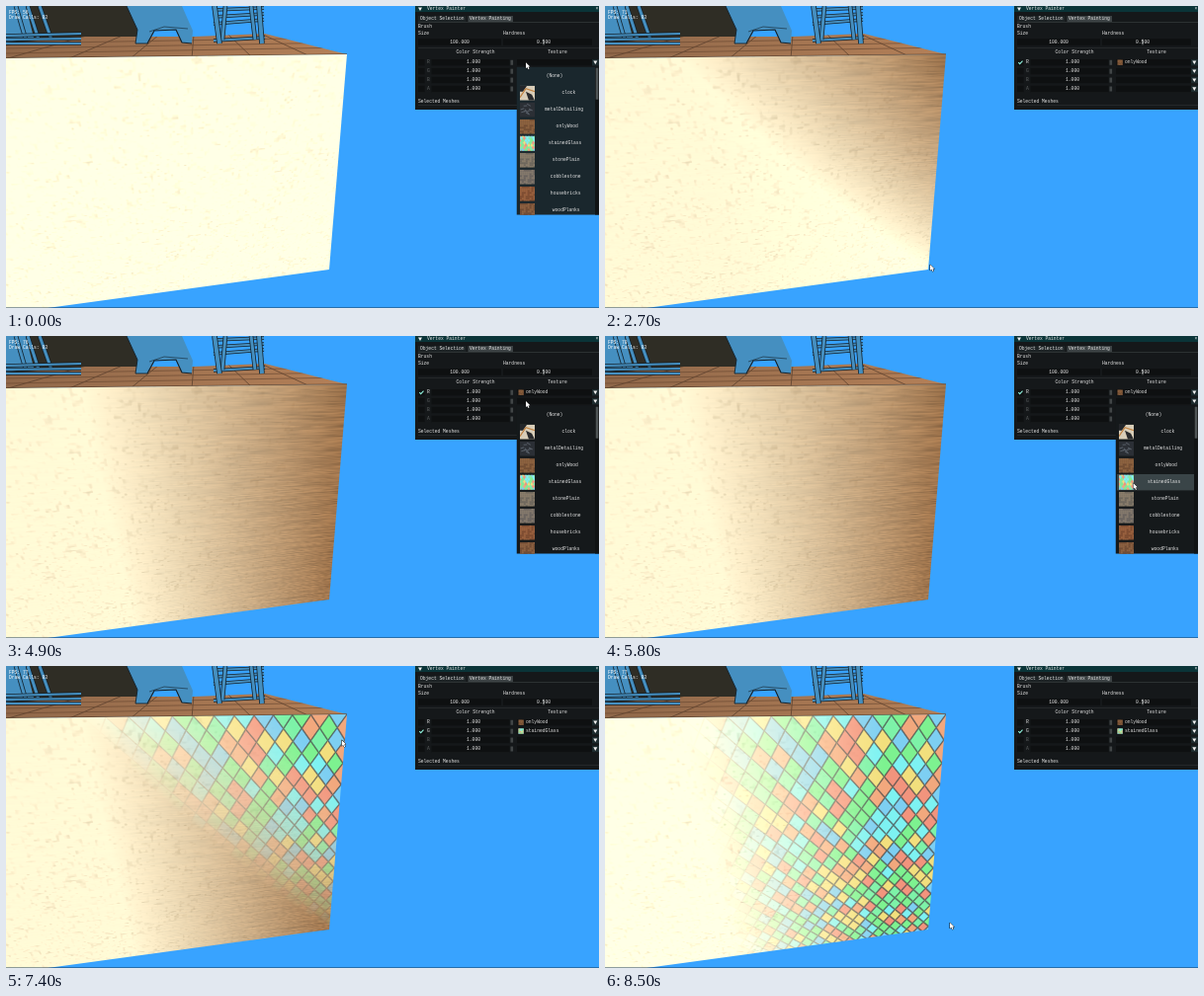
These frames come from a looping animation (600 by 306 pixels, 8600 ms). An HTML page with a canvas:

```html
<!DOCTYPE html>
<html lang="en">
<head>
<meta charset="utf-8">
<title>Vertex Painter</title>
<style>
html, body { margin: 0; width: 100%; height: 100%; overflow: hidden; background: #38a3ff; }
canvas { display: block; width: 600px; height: 306px; }
</style>
</head>
<body>
<canvas id="stage" width="600" height="306"></canvas>
<script>
const LOOP = 8600;
const ctx = document.getElementById('stage').getContext('2d');
const clamp = x => Math.max(0, Math.min(1, x));
const ramp = (t, from, to) => clamp((t - from) / (to - from));
const mix = (a, b, k) => a + (b - a) * k;
const ease = x => x * x * (3 - 2 * x);
const times = (n, draw) => { for (let i = 0; i < n; i++) draw(i); };
const hash = (i, j) => {
  const v = Math.sin(i * 127.1 + j * 311.7) * 43758.5453;
  return v - Math.floor(v);
};
function noise(x, y) {
  const i = Math.floor(x), j = Math.floor(y), fx = ease(x - i), fy = ease(y - j);
  return mix(mix(hash(i, j), hash(i + 1, j), fx), mix(hash(i, j + 1), hash(i + 1, j + 1), fx), fy);
}

function trace(points, g) {
  g.beginPath();
  points.forEach(([x, y]) => g.lineTo(x, y));
}
function poly(points, fill, g = ctx) {
  trace(points, g);
  g.fillStyle = fill;
  g.fill();
}
function line(points, color, width, g = ctx) {
  trace(points, g);
  g.strokeStyle = color;
  g.lineWidth = width;
  g.stroke();
}
function rect(x, y, w, h, fill) {
  ctx.fillStyle = fill;
  ctx.fillRect(x, y, w, h);
}
function text(str, x, y, color = '#e4e4e4', align = 'left') {
  ctx.font = '4.65px "Liberation Mono", monospace';
  ctx.textBaseline = 'middle';
  ctx.textAlign = align;
  ctx.fillStyle = color;
  ctx.fillText(str, x, y);
}

// ---- Script of the demo, in ms ----
const AT = {
  pickWood: 650, checkWood: 880, woodTop: 1550, woodBottom: 2720, openGlass: 4400,
  pickGlass: 6250, uncheckWood: 6500, checkGlass: 6720, glassTop: 7020, glassBottom: 7800
};

// ---- Painted wall: a plane in perspective, shaded per pixel ----
const corner = [345, 49], lowCorner = [327, 267], sideVanish = [2095, 29], downVanish = [300, 594];
const wallOutline = [[0, 53], corner, lowCorner, [42, 306], [0, 306]];
const W = 347, TOP = 47, H = 306 - TOP;
function wallCoords(x, y) {
  const ax = sideVanish[0] - corner[0], ay = sideVanish[1] - corner[1];
  const bx = downVanish[0] - corner[0], by = downVanish[1] - corner[1];
  const det = ax * by - ay * bx, px = x - corner[0], py = y - corner[1];
  const b = (px * by - py * bx) / det, c = (ax * py - ay * px) / det, a = 1 - b - c;
  return [b / a, c / a, a];
}
const leftU = wallCoords(75, 52)[0], bottomV = wallCoords(...lowCorner)[1];

// Pastel pane colour for a lattice cell: hue from a small set, HSL to RGB.
const HUES = [12, 22, 50, 130, 142, 180, 198];
function paneColor(i, j) {
  const hue = HUES[Math.floor(hash(i, j) * HUES.length)], light = 0.72, chroma = 0.23;
  return [0, 8, 4].map(n => {
    const k = (n + hue / 30) % 12;
    return 255 * (light - chroma * Math.max(-1, Math.min(k - 3, 9 - k, 1)));
  });
}
function glassColor(u, v, depth) {
  const a = u / 0.0102, b = v / 0.05, p = a + b, q = a - b;
  const i = Math.floor(p), j = Math.floor(q);
  const edge = Math.min(p - i, 1 - p + i, q - j, 1 - q + j) * 15 * depth ** 1.5;
  const lead = clamp(1.2 - edge) * 0.75;
  return paneColor(i, j).map(c => mix(c, 72, lead));
}
const texels = [];
times(H, y => times(W, x => {
  const [u, v, depth] = wallCoords(x + 0.5, y + TOP + 0.5);
  const speck = Math.max(0, noise(u * 500 + v * 30, v * 170) - 0.6) * noise(u * 120, v * 60);
  const grain = noise(u * 60, v * 320) + noise(u * 130, v * 520) - 1;
  texels.push({
    s: clamp(u / leftU / (1 + 0.25 * v / bottomV)), t: clamp(v / bottomV),
    base: [275, 266, 230].map(c => c - speck * 90),
    wood: [158, 115, 75].map(c => c * (1 + grain * 0.17)),
    glass: glassColor(u, v, depth)
  });
}));
const wall = document.createElement('canvas');
wall.width = W;
wall.height = H;
const wallCtx = wall.getContext('2d');
const pixels = wallCtx.createImageData(W, H);
let shaded = '';

// Linear blend of the vertex weights over the two triangles of the quad.
const vertexBlend = (s, t, top, bottom, left) => s + t < 1
  ? top * (1 - s - t) + bottom * t + left * s
  : bottom * (1 - s) + left * s;

function shadeWall(t) {
  const glassTop = ramp(t, AT.glassTop, AT.glassTop + 330);
  const glassBottom = ramp(t, AT.glassBottom, AT.glassBottom + 400);
  const woodTop = ramp(t, AT.woodTop, AT.woodTop + 600) * (1 - glassTop);
  const woodBottom = ramp(t, AT.woodBottom, AT.woodBottom + 580) * (1 - glassBottom);
  const woodLeft = 0.1 * ramp(t, AT.woodTop, AT.woodTop + 600) * (1 - glassBottom);
  const key = [glassTop, glassBottom, woodTop, woodBottom, woodLeft].join();
  if (key === shaded) return;
  shaded = key;
  texels.forEach((p, n) => {
    const wood = vertexBlend(p.s, p.t, woodTop, woodBottom, woodLeft);
    const glass = clamp(1.35 * vertexBlend(p.s, p.t, glassTop, glassBottom, 0));
    times(3, k => {
      pixels.data[n * 4 + k] = mix(mix(p.base[k], p.wood[k], wood), p.glass[k], glass);
    });
    pixels.data[n * 4 + 3] = 255;
  });
  wallCtx.putImageData(pixels, 0, 0);
}
function drawWall(t) {
  shadeWall(t);
  ctx.save();
  trace(wallOutline, ctx);
  ctx.clip();
  ctx.drawImage(wall, 0, TOP);
  ctx.restore();
}

// ---- Room behind the wall ----
function drawRoom() {
  const blue = '#458fc0', dark = '#14222c';
  const beam = (x1, y1, x2, y2, width) => {
    line([[x1, y1], [x2, y2]], dark, width + 1.6);
    line([[x1, y1], [x2, y2]], blue, width);
  };
  poly([[0, 0], [134, 0], [133, 32], [0, 39]], '#2f2d25');
  const floor = [[0, 38], [75, 31], [190, 31], [262, 28], corner, [0, 53]];
  const shade = ctx.createLinearGradient(0, 0, 345, 0);
  shade.addColorStop(0, '#8f6749');
  shade.addColorStop(1, '#b48058');
  poly(floor, shade);
  ctx.save();
  ctx.clip();
  times(7, i => line([[50 + i * 35, 29], [i * 62 - 60, 53]], '#523a29', 0.7));
  times(3, i => line([[0, 38 + i * 5], [345, 32 + i * 5]], '#6b4a33', 0.7));
  ctx.restore();
  line([[0, 52.6], [345, 48.8]], '#5a4230', 0.8);
  // Folding chair
  poly([[0, 0], [20, 0], [28, 32], [0, 37]], blue);
  times(3, i => beam(10 + i * 12, 0, 20 + i * 13, 34, 3));
  times(3, i => beam(0, 38 - i * 4, 76, 38 - i * 5, 2));
  // Cloth with an arched opening
  poly([[122, 0], [178, 0], [189, 25], [188, 38], [178, 37], [172, 24], [150, 25], [143, 38], [131, 38], [133, 24]], blue);
  line([[143, 38], [150, 25], [172, 24], [178, 37], [188, 38]], dark, 1.2);
  line([[122, 0], [133, 24], [131, 38], [143, 38]], dark, 0.9);
  line([[145, 26], [160, 21], [184, 23]], dark, 0.6);
  // Stool
  times(3, i => beam(210, 4 + i * 7, 261, 2 + i * 6, 2));
  beam(210, 35, 262, 32, 2);
  times(2, i => {
    beam(222 + i * 26, 0, 219 + i * 33, 34, 3);
    beam(211 + i * 45, 0, 216 + i * 43, 38, 4);
  });
}

// ---- Editor panel ----
const ITEMS = [
  ['clock', '#d8cdb8'], ['metalDetailing', '#2b2f35'], ['onlyWood', '#80583a'], ['stainedGlass', '#a9c6a8'],
  ['stonePlain', '#7c7468'], ['cobblestone', '#77706a'], ['housebricks', '#8d5638'], ['woodPlanks', '#7f563b']
];
const WOOD = 2, STAINED = 3;
const FIELD = '#0e1011';
const rowY = row => 57.2 + row * 8.9;
const listTop = row => 61.7 + row * 9;
const itemY = (row, item) => listTop(row) + 26.3 + item * 17;

function icon(item, x, y, size) {
  ctx.save();
  ctx.translate(x, y);
  ctx.scale(size / 5, size / 5);
  ctx.beginPath();
  ctx.rect(0, 0, 5, 5);
  ctx.clip();
  rect(0, 0, 5, 5, ITEMS[item][1]);
  if (item === 0) {
    poly([[0, 0], [2.4, 0], [1, 2], [0, 2]], '#23262a');
    poly([[2, 2], [4, 3], [5, 5], [3, 5]], '#292a2c');
    line([[0, 4], [2, 1], [5, 2]], '#c18444', 0.4);
  } else if (item === 1) {
    times(9, i => {
      const a = hash(i, 3) * 4, b = hash(i, 8) * 4;
      line([[a, b], [a + 1.2, b + hash(i, 5) * 2 - 0.5]], '#565d66', 0.35);
    });
  } else if (item === STAINED) {
    times(8, j => times(6, i => {
      const cx = i + (j % 2) / 2, cy = j * 0.8 - 0.8;
      poly([[cx, cy], [cx + 0.45, cy + 0.75], [cx, cy + 1.5], [cx - 0.45, cy + 0.75]], `rgb(${paneColor(i, j)})`);
    }));
  } else {
    times(8, j => times(8, i => {
      rect(i * 0.65, j * 0.65, 0.6, 0.55, hash(i + item, j) > 0.5 ? 'rgba(255,190,130,.1)' : 'rgba(0,0,0,.12)');
    }));
  }
  ctx.restore();
}
function arrow(x, y) {
  poly([[x - 2, y - 1.6], [x + 2, y - 1.6], [x, y + 2]], '#f0f0f0');
}
function drawRow(row, name, item, checked) {
  const y = rowY(row);
  rect(417, y - 3.2, 6.6, 6.4, FIELD);
  if (checked) line([[418.3, y], [419.7, y + 1.5], [422.5, y - 1.5]], '#8ff0dc', 1.1);
  text(name, 426, y, item ? '#e4e4e4' : '#5c6061');
  rect(430.5, y - 3.2, 79, 6.4, FIELD);
  text('1.000', 473, y, undefined, 'center');
  rect(510.5, y - 2.4, 2.6, 5, '#414546');
  rect(517, y - 3.2, 76, 6.4, FIELD);
  rect(593, y - 3.2, 7, 6.4, '#1d2b2e');
  arrow(596.3, y);
  if (item) {
    icon(item, 518.3, y - 2.9, 5.6);
    text(ITEMS[item][0], 526, y);
  }
}
function drawPanel(t) {
  rect(414, 0, 186, 105, '#15181a');
  rect(414, 0, 186, 6, '#0a3438');
  arrow(419, 3);
  text('Vertex Painter', 426, 3.2);
  text('×', 598, 3.2, '#fff', 'center');
  rect(417, 10, 48.5, 6, '#1d2325');
  rect(467.5, 10, 45.5, 6, '#3c4244');
  text('Object Selection', 419, 13);
  text('Vertex Painting', 469, 13);
  rect(417, 16, 183, 0.6, '#3c4244');
  text('Brush', 417, 20.7);
  text('Size', 417, 28.2);
  text('Hardness', 503, 28.2);
  rect(417, 33.2, 84, 6.6, FIELD);
  rect(503, 33.2, 90, 6.6, FIELD);
  text('100.000', 459, 36.7, undefined, 'center');
  rect(543, 33.6, 2, 5.8, '#4b4f50');
  text('0.500', 544, 36.7, undefined, 'center');
  rect(417, 42, 183, 0.5, '#34393a');
  text('Color Strength', 475, 46.7, undefined, 'center');
  text('Texture', 558, 46.7, undefined, 'center');
  drawRow(0, 'R', t >= AT.pickWood && WOOD, t >= AT.checkWood && t < AT.uncheckWood);
  drawRow(1, 'G', t >= AT.pickGlass && STAINED, t >= AT.checkGlass);
  drawRow(2, 'B');
  drawRow(3, 'A');
  text('Selected Meshes', 417, 96.7);
  rect(417, 100.3, 183, 0.5, '#34393a');
}
function drawDropdown(row, pointerY) {
  const top = listTop(row);
  ctx.save();
  ctx.beginPath();
  ctx.rect(516.5, top, 83.5, 150);
  ctx.clip();
  rect(516.5, top, 83.5, 150, row ? '#15191b' : '#1a272d');
  text('(None)', 555, top + 9.3, undefined, 'center');
  ITEMS.forEach(([name], item) => {
    const y = itemY(row, item);
    if (Math.abs(pointerY + 2 - y) < 8.5) rect(518, y - 8, 78, 16.4, '#3a4548');
    icon(item, 520, y - 7.3, 15);
    text(name, 572 - 0.53 * name.length, y, undefined, 'center');
  });
  rect(596, top, 4, 150, '#101314');
  rect(596.7, top + 1, 2.6, 32, '#4f5556');
  ctx.restore();
}

// ---- Pointer: rests at each stop, then glides to arrive at the next on time ----
const combo = row => [526, rowY(row)];
const checkbox = row => [421, rowY(row)];
const STOPS = [
  [0, combo(0)], [AT.pickWood - 50, [531, itemY(0, WOOD)]], [AT.checkWood - 40, checkbox(0)], [1200, [376.5, 100]],
  [AT.woodTop, corner], [AT.woodBottom - 70, [329, 262]], [3700, [526.5, 80]], [AT.openGlass - 50, combo(1)],
  [5700, [534.5, itemY(1, STAINED) + 1]], [AT.uncheckWood, checkbox(0)], [AT.checkGlass, checkbox(1)],
  [AT.glassTop, [341, 53]], [AT.glassBottom, [329, 262]], [8500, [349, 260]]
];
function pointerAt(t) {
  const next = STOPS.findIndex(stop => stop[0] > t);
  if (next < 0) return STOPS[STOPS.length - 1][1];
  const [left, from] = STOPS[next - 1], [arrive, to] = STOPS[next];
  const k = ease(ramp(t, arrive - Math.min(500, (arrive - left) * 0.85), arrive));
  return from.map((v, axis) => mix(v, to[axis], k));
}
function drawPointer(x, y) {
  const shape = [[0, 0], [0, 6], [1.4, 4.8], [2.5, 7], [3.5, 6.5], [2.5, 4.4], [4.3, 4.2], [0, 0]]
    .map(([dx, dy]) => [x + dx, y + dy]);
  line(shape, '#111', 1);
  poly(shape, '#fff');
}

function draw(t) {
  const pointer = pointerAt(t);
  rect(0, 0, 600, 306, '#38a3ff');
  drawRoom();
  drawWall(t);
  rect(0, 305.2, 600, 0.8, 'rgba(20,50,80,.6)');
  text('FPS: ' + Math.floor(52 + 29 * hash(Math.floor(t / 500), 4)), 3, 6.3, '#fff');
  text('Draw Calls: 83', 3, 11.8, '#fff');
  drawPanel(t);
  if (t < AT.pickWood) drawDropdown(0, pointer[1]);
  if (t >= AT.openGlass && t < AT.pickGlass) drawDropdown(1, pointer[1]);
  drawPointer(...pointer);
}
const start = performance.now();
function frame() {
  draw((performance.now() - start) % LOOP);
  requestAnimationFrame(frame);
}
frame();
</script>
</body>
</html>
```
